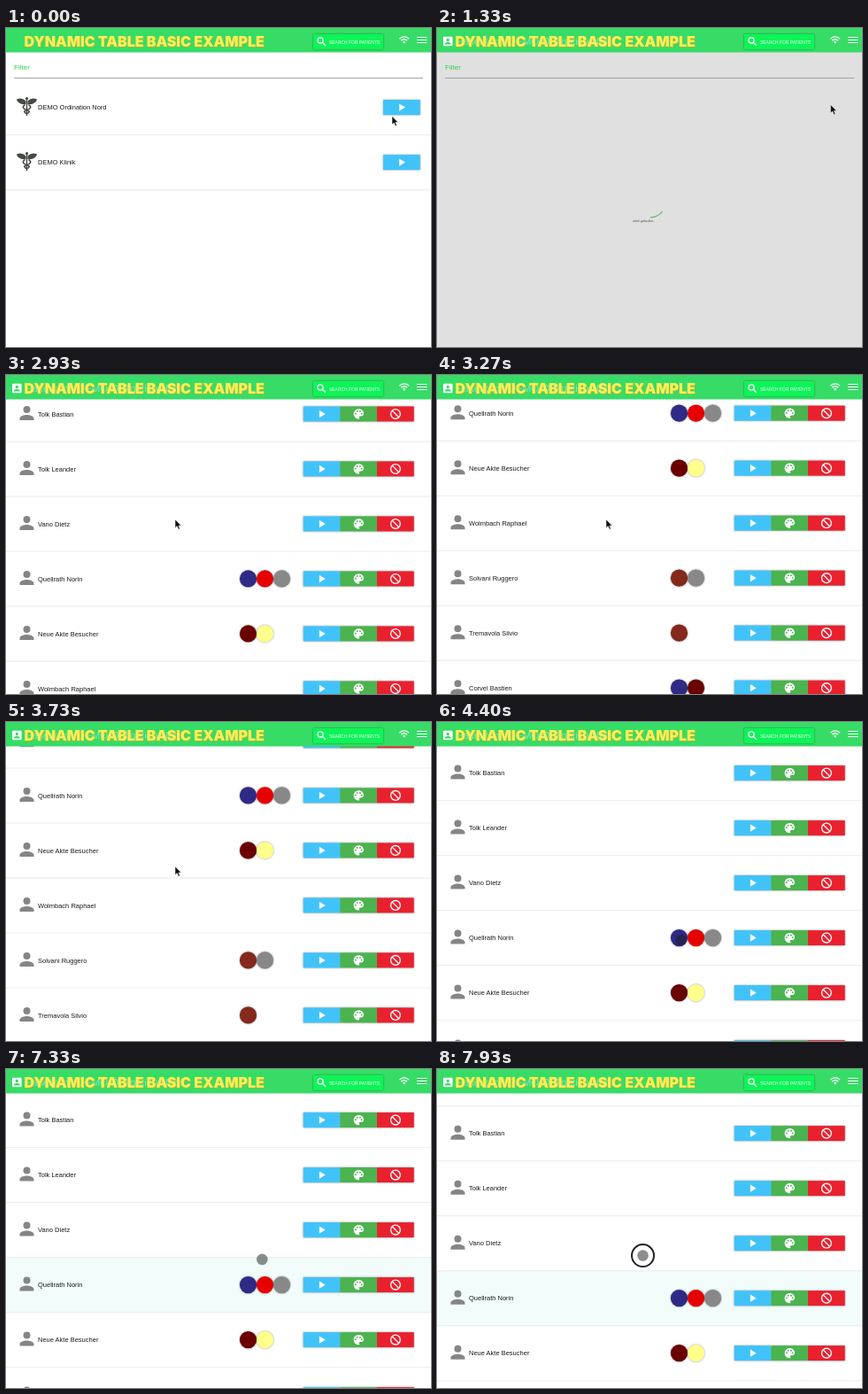
An HTML page for the animation above (8 s loop, 480 px wide and 360 px high).

```html
<!DOCTYPE html>
<html lang="en">
<head>
<meta charset="utf-8">
<title>Dynamic table</title>
<style>
  html, body { margin: 0; width: 100%; height: 100%; overflow: hidden; background: #fff; }
  svg { display: block; width: 100%; height: 100%; }
  text { font-family: "Liberation Sans", Arial, sans-serif; }
  .name { font-size: 7.5px; fill: #1c1c1c; }
  .raised { filter: drop-shadow(0 .7px .8px rgba(0, 0, 0, .4)); }
  .line { fill: none; stroke: #fff; stroke-width: 1.3; }
  .title text { font: 900 16px Inter, "Open Sans", sans-serif; }
</style>
</head>
<body>
<svg viewBox="0 0 480 360">
  <defs>
    <path id="person" d="M0-.5a4 4 0 1 0 0-8 4 4 0 0 0 0 8Zm0 2c-2.7 0-8 1.3-8 4v2H8v-2c0-2.7-5.3-4-8-4Z"/>
    <path id="play" d="M-2.8-4.2V4.2L4 0Z" fill="#fff"/>
    <g id="palette">
      <path d="M0-5.7A5.7 5.7 0 0 0 0 5.7C1 5.7 1.2 4.7.7 4.1.2 3.4.6 2.5 1.5 2.5H2.6A3.1 3.1 0 0 0 5.7-.6C5.7-3.5 3.1-5.7 0-5.7Z" fill="#fff"/>
      <g fill="#4bb34f"><circle cx="-3.4" cy="-.3" r=".95"/><circle cx="-1.6" cy="-2.9" r=".95"/><circle cx="1.6" cy="-2.9" r=".95"/><circle cx="3.4" cy="-.3" r=".95"/></g>
    </g>
    <g id="block" class="line"><circle r="5.4"/><path d="M-3.8-3.8 3.8 3.8"/></g>
    <g id="staff" fill="none" stroke="#454a45">
      <path d="M0-8V10.500" stroke-width="1.4"/>
      <path d="M-1-6C-4-9-8-10-11.500-8-11-5-7-1.500-1-2.500ZM1-6C4-9 8-10 11.500-8 11-5 7-1.500 1-2.500Z" fill="#454a45" stroke="none"/>
      <path d="M-2-2C-6 0-4 3 0 4S3 7 0 8M2-2C6 0 4 3 0 4S-3 7 0 8" stroke-width="1.6"/>
      <circle cy="-9" r="1.600" fill="#454a45" stroke="none"/>
    </g>
  </defs>

  <rect width="480" height="360" fill="#fff"/>
  <g id="practices"></g>
  <g id="patients">
    <rect id="highlight" y="306.600" width="480" height="62" fill="#f1fcfb"/>
    <g id="rows"></g>
  </g>
  <rect id="shade" y="27" width="480" height="333" fill="#e0e0e0"/>
  <g id="filter">
    <text x="9" y="47.200" font-size="8.100" fill="#2ed052">Filter</text>
    <rect x="9" y="56" width="462" height="1" fill="#a4a4a4"/>
  </g>
  <g id="loader">
    <path id="arc" fill="none" stroke="#5fb573" stroke-width="1.100"/>
    <text x="221" y="219.200" font-size="4.100" fill="#555">wird geladen..</text>
  </g>

  <rect width="480" height="27.500" fill="#36dc66"/>
  <g id="account">
    <rect x="7" y="9.700" width="10.600" height="10.600" rx="1.200" fill="#fff"/>
    <use href="#person" transform="translate(12.300 15.400) scale(.42)" fill="#36dc66"/>
    <text x="22" y="19" font-size="11.500" fill="#7deabf">Patienten - DEMO Ordination Nord</text>
  </g>
  <g class="title">
    <text x="21.300" y="21.800" fill="#a8b53c">DYNAMIC TABLE BASIC EXAMPLE</text>
    <text x="20.500" y="21" fill="#fbee55">DYNAMIC TABLE BASIC EXAMPLE</text>
  </g>
  <rect class="raised" x="347" y="7" width="79" height="17" rx="1" fill="#0df458"/>
  <g class="line"><circle cx="355" cy="14" r="3.100"/><path d="M357.300 16.300 361 20"/></g>
  <text x="365" y="18.300" font-size="4.950" fill="#fff">SEARCH FOR PATIENTS</text>
  <g class="line">
    <path d="M444.300 12.200Q449.700 7.600 455.100 12.200M446.300 14.300Q449.700 11.300 453.100 14.300"/>
    <path d="M464 10.500H475.500M464 13.500H475.500M464 16.500H475.500" stroke-width="1.1"/>
  </g>
  <path d="M447.900 15.700Q449.700 14.300 451.500 15.700L449.700 17.700Z" fill="#fff"/>

  <g id="tooltip">
    <rect x="-15.500" y="260" width="31" height="12" fill="#666"/>
    <text id="tip" y="267.600" font-size="4.600" fill="#eee" text-anchor="middle"></text>
  </g>
  <path id="arrow" d="M0 0V9.600L2.200 7.600 3.800 11.200 5.400 10.500 3.900 7H6.900Z" fill="#111" stroke="#fff" stroke-width=".5"/>
  <g id="touch">
    <circle id="ring" r="12.500" fill="none" stroke="#222" stroke-width="2"/>
    <circle r="6.300" fill="#1c1c1c" fill-opacity=".5"/>
  </g>
</svg>
<script>
const LOOP = 8000, STEP = 200 / 3, ROW = 62, FIRST = 89.6;
const $ = id => document.getElementById(id);

const BLUE = '#2f2a86', RED = '#e60000', GREY = '#888', MAROON = '#6a0000',
      YELLOW = '#ffff8c', BROWN = '#84291c';
const people = [
  ['Dorvane Mathilde'], ['Tolk Bastian'], ['Tolk Leander'], ['Vano Dietz'],
  ['Quellrath Norin', BLUE, RED, GREY],
  ['Neue Akte Besucher', MAROON, YELLOW],
  ['Wolmbach Raphael'],
  ['Solvani Ruggero', BROWN, GREY],
  ['Tremavola Silvio', BROWN],
  ['Corvel Bastien', BLUE, MAROON]
];

const button = (x, color, icon) =>
  `<rect x="${x}" y="-8.5" width="41.7" height="17" fill="${color}"/><use href="#${icon}" x="${x + 20.9}"/>`;
const row = (i, name, extra) =>
  `<g transform="translate(0 ${FIRST + ROW * i})">
    <rect y="30.6" width="480" height="1" fill="#ebebeb"/>
    <text class="name" x="36" y="2.7">${name}</text>${extra}</g>`;

$('practices').innerHTML = ['DEMO Ordination Nord', 'DEMO Klinik'].map((name, i) =>
  row(i, name, `<use href="#staff" x="23.5" y="-1"/><g class="raised">${button(426, '#41c3f9', 'play')}</g>`)
).join('');

$('rows').innerHTML = people.map(([name, ...marks], i) => row(i, name,
  '<use href="#person" x="23.500" y="-.5" fill="#858585"/>' +
  marks.map((c, k) => `<circle class="raised" cx="${273.5 + 19 * k}" r="9.6" fill="${c}"/>`).join('') +
  `<g class="raised">${button(335.8, '#41c3f9', 'play')}${button(377.4, '#4bb34f', 'palette')}${button(419, '#e9212f', 'block')}</g>`
)).join('');

// Keys are [time, ...values]; values ease between neighbouring keys.
function track(keys, t) {
  if (t <= keys[0][0]) return keys[0].slice(1);
  const n = keys.findIndex(k => k[0] > t);
  if (n < 0) return keys[keys.length - 1].slice(1);
  const a = keys[n - 1], b = keys[n];
  const u = (t - a[0]) / (b[0] - a[0]), e = u * u * (3 - 2 * u);
  return a.slice(1).map((v, i) => v + (b[i + 1] - v) * e);
}

const scrollKeys = [[2700, 0], [3270, 294.5], [3500, 300], [4270, 94], [7700, 94], [7960, 78.5]];
const arrowKeys = [[0, 436, 99.5], [500, 444.5, 86.5], [2500, 444.5, 86.5], [2900, 191, 163], [3800, 191, 163]];
const touchKeys = [[3800, 191, 168], [4330, 275.5, 246], [5200, 275.5, 246], [5400, 293, 246],
  [5650, 293, 246], [5850, 311, 246], [6000, 311, 246], [6200, 293, 305], [6400, 293, 305],
  [6800, 398, 252], [7000, 398, 252], [7550, 232.5, 195.5], [7700, 232.5, 195.5], [7960, 232.5, 211]];
const tips = [[4700, 5300, 273.5, 'Diabetiker'], [5400, 5730, 292.5, 'Allergiker'], [5850, 6420, 311.5, 'Alkoholiker']];

const show = (id, on) => $(id).style.display = on ? '' : 'none';
const place = (id, x, y) => $(id).setAttribute('transform', `translate(${x} ${y})`);

function drawArc(t) {
  const cycle = (t - 1330) / 1333, phase = cycle - Math.floor(cycle);
  const start = .68 + cycle * Math.PI * 2.4;
  const sweep = .84 + 1.9 * (1 - Math.cos(phase * Math.PI * 2));
  const point = a => `${240 + 19 * Math.cos(a)} ${195 + 19 * Math.sin(a)}`;
  $('arc').setAttribute('d', `M${point(start)}A19 19 0 ${sweep > Math.PI ? 1 : 0} 1 ${point(start + sweep)}`);
}

function draw(time) {
  const t = Math.floor((time % LOOP) / STEP + .06) * STEP;
  const opened = t >= 660, loaded = t >= 1930;
  const [scroll] = track(scrollKeys, t);

  show('practices', !opened);
  show('account', opened);
  show('shade', opened && !loaded);
  show('loader', opened && !loaded);
  show('patients', loaded);
  show('highlight', t >= 4500);
  place('patients', 0, -scroll);
  place('filter', 0, -scroll);
  drawArc(t);

  const tip = tips.find(([from, to]) => t >= from && t < to);
  show('tooltip', tip);
  if (tip) {
    place('tooltip', tip[2], 0);
    $('tip').textContent = tip[3];
  }

  const touching = t >= 3850;
  show('arrow', !touching);
  show('touch', touching);
  show('ring', t >= 7650);
  place('arrow', ...track(arrowKeys, t));
  place('touch', ...track(touchKeys, t));
}

const began = performance.now();
function tick() {
  draw(performance.now() - began);
  requestAnimationFrame(tick);
}
draw(0);
requestAnimationFrame(tick);
</script>
</body>
</html>
```
